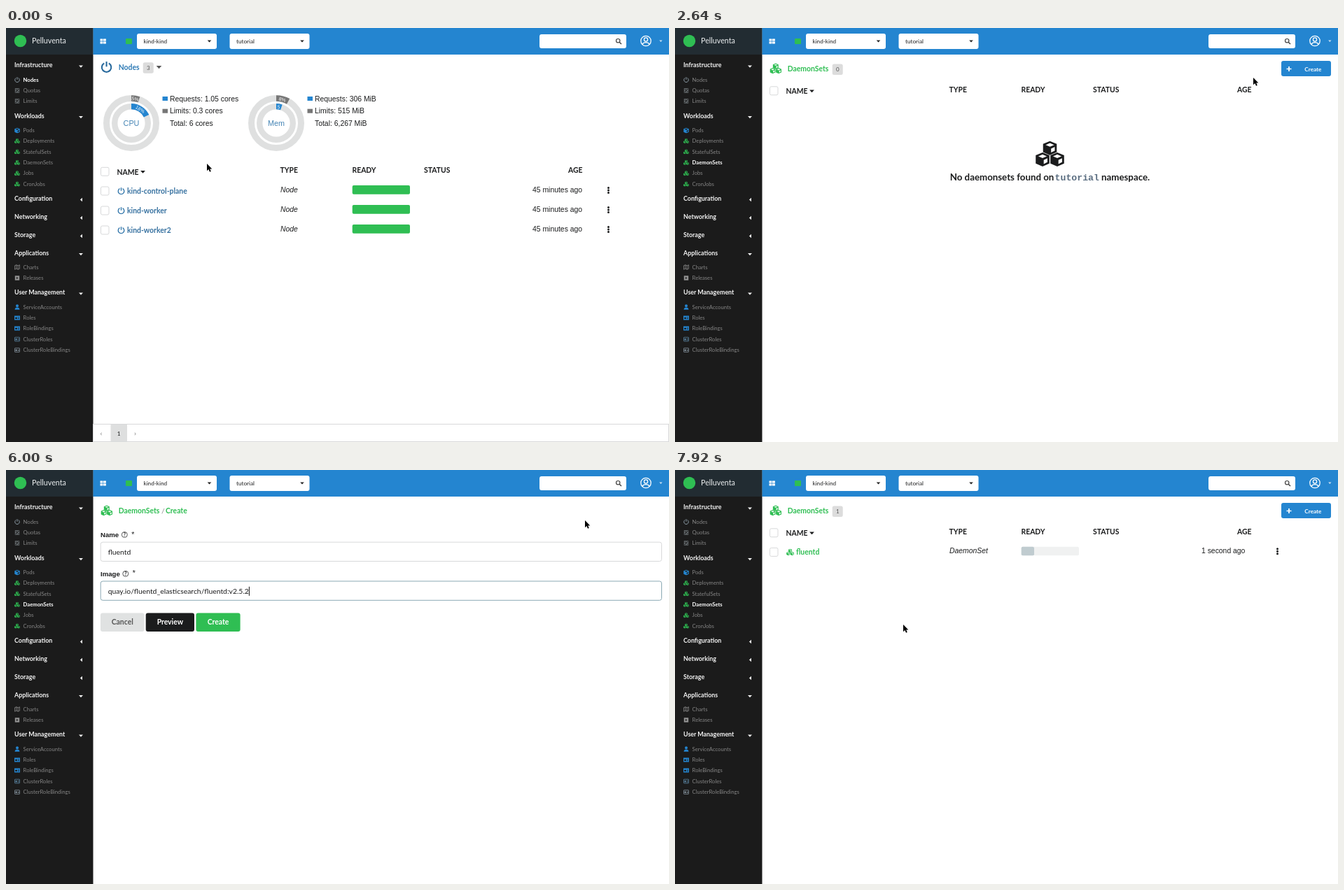
An HTML page for the animation above (8 s loop, 947 px wide and 592 px high).

```html
<!DOCTYPE html>
<html lang="en">
<head>
<meta charset="utf-8">
<title>Cluster console</title>
<style>
html, body { margin: 0; width: 100%; height: 100%; overflow: hidden; background: #fff; }
svg { display: block; }
#stage { width: 947px; height: 592px; }
text { font: 10.4px Lato, sans-serif; fill: #1b1c1d; white-space: pre; }
.bold { font-weight: 700; }
.plain { font-family: "Liberation Sans", Arial, sans-serif; }
.italic { font-style: italic; }
.mid { text-anchor: middle; }
.small { font-size: 8.2px; }
.label { font: 700 9.6px "Liberation Sans", Arial, sans-serif; }
.section { font-size: 8.9px; font-weight: 700; fill: #f4f4f4; }
.item { font-size: 7.65px; fill: #868686; }
.item.hover { fill: #f2f2f2; }
.item.active { fill: #fff; font-weight: 700; }
.big { font-size: 13.3px; font-weight: 700; }
.code { font: 700 13.2px "Liberation Mono", monospace; fill: #5a6d80; }
.link { fill: #35709f; font-weight: 700; }
.green { fill: #2fbe53; font-weight: 700; }
.white { fill: #fff; font-weight: 700; }
.hint { fill: #b4bfc1; }
.pct { font: 7px "Liberation Sans", Arial, sans-serif; fill: #fff; text-anchor: middle; }
</style>
</head>
<body>
<svg id="stage" viewBox="0 0 947 592" xmlns="http://www.w3.org/2000/svg"></svg>
<script>
const BLUE = '#2485d0', GREEN = '#2fbe53', GREY = '#767676', DARK = '#1b1c1d', LINE = '#d8d9da';
const LOOP = 8000, STEP = 120;
const OPEN_LIST = 1560, OPEN_FORM = 3480, TYPE = 4080, TO_IMAGE = 5280, PASTE = 5640, SUBMIT = 7320;

const text = (x, y, s, cls = '', more = '') => `<text x="${x}" y="${y}" class="${cls}" ${more}>${s}</text>`;
const rect = (x, y, w, h, fill, r = 0, more = '') =>
  `<rect x="${x}" y="${y}" width="${w}" height="${h}" rx="${r}" fill="${fill}" ${more}/>`;
const path = (d, fill, more = '') => `<path d="${d}" fill="${fill}" ${more}/>`;
const line = (d, color, w = 1) => path(d, 'none', `stroke="${color}" stroke-width="${w}"`);
const circle = (x, y, r, color, w) => `<circle cx="${x}" cy="${y}" r="${r}" fill="none" stroke="${color}" stroke-width="${w}"/>`;
const group = (id, body) => `<g id="${id}">${body}</g>`;
const icon = (name, x, y, w, h, color) =>
  `<use href="#${name}" x="${x}" y="${y}" width="${w}" height="${h}" color="${color}"/>`;
const symbol = (id, w, h, body) => `<symbol id="${id}" viewBox="0 0 ${w} ${h}">${body}</symbol>`;
const down = (x, y, r, color) => path(`M${x - r} ${y - r / 2}h${2 * r}l${-r} ${r * 1.1}z`, color);

const C = 'currentColor';
const cube = (x, y) => path(`M${x} ${y - 9.5}l9.3 4v11l-9.3 4.2-9.3-4.2v-11z` +
  `M${x} ${y - 6.7}l-5.8 2.5 5.8 2.5 5.8-2.5zM${x + 1.6} ${y + 6.2}l5-2.4v-5.3l-5 2.3z`, C, 'fill-rule="evenodd"');

const defs = `<defs>
  ${symbol('power', 16, 16, line('M4.8 2.8A6.5 6.5 0 1 0 11.2 2.8M8 .6V7.6', C, 2))}
  ${symbol('cubes', 40, 36, cube(20, 10) + cube(10, 25.5) + cube(30, 25.5))}
  ${symbol('cube', 20, 20, cube(10, 10))}
  ${symbol('user', 10, 10, `<circle cx="5" cy="2.7" r="2.5" fill="${C}"/>` + path('M.7 9.6c0-5.4 8.6-5.4 8.6 0z', C))}
  ${symbol('card', 10, 10, path('M0 1.2h10v7.6H0zM1.5 6.8h3.3V4H1.5zM6 3.6v1h2.8v-1zM6 5.8v1h2.8v-1z', C, 'fill-rule="evenodd"'))}
  ${symbol('badge', 10, 10, rect(.6, 1.6, 8.8, 7, 'none', .6, `stroke="${C}"`) + path('M2 6.8V3.6h2.6v3.2zM6 4h2.4v1H6zM6 6h2.4v1H6z', C))}
  ${symbol('map', 10, 10, line('M.5 2.3L3.5 1l3 1.3 3-1.3v6.7l-3 1.3-3-1.3-3 1.3zM3.5 1v6.7M6.5 2.3V9', C))}
  ${symbol('quota', 10, 10, path('M1 1h8v8H1z', C, 'opacity=".55"') + line('M2 8l6-6M2 3.5h3M6 7h2.4', '#1b1b1b', 1.3))}
  ${symbol('release', 10, 10, path('M1 1h8v8H1zM3.6 3v4l3.4-2z', C, 'fill-rule="evenodd"'))}
  <pattern id="hatch" width="2" height="2" patternUnits="userSpaceOnUse">
    ${rect(0, 0, 2, 2, '#ccd5d8') + rect(0, 0, 1, 1, '#b4c2c7') + rect(1, 1, 1, 1, '#b4c2c7')}
  </pattern>
</defs>`;

// Sidebar: [title, y, expanded, [item, y, icon, color]...]
const menu = [
  ['Infrastructure', 53, 1, ['Nodes', 74, 'power', '#8a9aa5'], ['Quotas', 89.5, 'quota', '#a5b0b5'], ['Limits', 104.5, 'quota', '#a5b0b5']],
  ['Workloads', 125.5, 1, ['Pods', 146.5, 'cube', BLUE], ...['Deployments', 'StatefulSets', 'DaemonSets', 'Jobs', 'CronJobs']
    .map((name, i) => [name, 161.5 + i * 15.4, 'cubes', GREEN])],
  ['Configuration', 243.5, 0], ['Networking', 269.5, 0], ['Storage', 295.5, 0],
  ['Applications', 321.5, 1, ['Charts', 342, 'map', '#909090'], ['Releases', 357.5, 'release', '#909090']],
  ['User Management', 378, 1, ['ServiceAccounts', 399, 'user', BLUE], ['Roles', 414.5, 'card', BLUE],
    ['RoleBindings', 429.5, 'card', BLUE], ['ClusterRoles', 445, 'badge', '#5c87a5'], ['ClusterRoleBindings', 460.5, 'badge', '#8795a0']],
];

const sidebar = rect(0, 0, 124.5, 592, '#1b1b1b') + rect(0, 0, 124.5, 38, '#222c32') +
  `<circle cx="20.5" cy="18.5" r="8.7" fill="${GREEN}"/>` + text(37, 22.3, 'Pelluventa', '', 'style="font-size:10.7px;fill:#eceff0"') +
  menu.map(([title, y, open, ...items]) => text(12, y + 3, title, 'section') +
    (open ? down(107, y + 2, 3, '#eee') : path(`M109 ${y - .8}v5.6l-3.2-2.8z`, '#eee')) +
    items.map(([name, iy, shape, color]) => icon(shape, 12, iy - 4, 8, 8, color) +
      text(24.6, iy + 2.7, name, 'item', `id="item${name}"`)).join('')).join('');

const select = (x, w, s) => rect(x, 8, w, 22, '#fff', 3) + text(x + 9.5, 22, s, 'small') + down(x + w - 10.5, 18.8, 2.8, '#222');
const header = rect(124.5, 0, 823, 38, BLUE) +
  [134.5, 139].map(x => rect(x, 15.5, 3.9, 3.1, '#fff') + rect(x, 19.4, 3.9, 3.1, '#fff')).join('') +
  rect(171, 15, 9, 8, GREEN, 1) + select(187, 114, 'kind-kind') + select(319.5, 114, 'tutorial') +
  rect(762, 9, 124, 20, '#fff', 3) + circle(874.2, 18.2, 2.7, '#444', 1.2) + line('M876.2 20.2l2.8 2.8', '#444', 1.5) +
  circle(914, 18.5, 7.2, '#fff', 1.3) + circle(914, 16.5, 2.6, '#fff', 1.3) + line('M909 23.4c1.5-3.6 8.5-3.6 10 0', '#fff', 1.3) +
  down(935.3, 18.6, 2.2, '#cfe3f3');

const count = (x, y, n) => rect(x, y, 15, 15.5, '#dcdcdc', 2.5) + text(x + 7.5, y + 10.8, n, 'mid', 'style="font-size:8px;fill:#555"');
const checkbox = y => rect(135.5, y - 6, 11.5, 12, '#fff', 2, `stroke="${LINE}"`);

const tableHead = y => checkbox(y) + text(158.5, y + 4.2, 'NAME', 'bold') + down(195.5, y + .3, 3.4, DARK) +
  [['TYPE', 391.5], ['READY', 494.5], ['STATUS', 597], ['AGE', 803]].map(([s, x]) => text(x, y + 2, s, 'bold')).join('');
const tableRow = (y, name, type, age, shape, cls, color, bar) => checkbox(y) + icon(shape, 159, y - 5.2, 11, 10.5, color) +
  text(173, y + 4, name, cls) + text(392, y + 1.7, type, 'plain italic') + bar +
  text(752, y + 2, age, 'plain') + [-4.6, -1.1, 2.4].map(d => `<circle cx="860.5" cy="${y + d}" r="1.5" fill="${DARK}"/>`).join('');

// Draws a share of a ring, clockwise from the top.
function arc(x, y, r, w, share, color) {
  const a = share * 2 * Math.PI;
  return line(`M${x} ${y - r}A${r} ${r} 0 0 1 ${x + r * Math.sin(a)} ${y - r * Math.cos(a)}`, color, w);
}
function ringLabel(x, y, r, share, s) {
  const a = share * Math.PI;
  const px = x + r * Math.sin(a), py = y - r * Math.cos(a);
  return text(px, py + 2.5, s, 'pct', `transform="rotate(${share * 180} ${px} ${py})"`);
}
const donut = (x, name, limit, request, limitText, requestText, legend) => circle(x, 136, 35.5, '#dfe0e0', 9) +
  circle(x, 136, 23.8, '#dfe0e0', 8.4) + arc(x, 136, 35.5, 8.6, limit, GREY) + arc(x, 136, 23.8, 8.2, request, BLUE) +
  ringLabel(x, 136, 35, limit, limitText) + ringLabel(x, 136, 23.5, request, requestText) +
  text(x, 139.8, name, 'plain mid', 'style="font-size:10.8px;fill:#4685b5"') +
  rect(x + 44.5, 98, 7.5, 6, BLUE) + rect(x + 44.5, 115.7, 7.5, 6, GREY) +
  legend.map((s, i) => text(x + 55, 104.5 + i * 17.7, s, 'plain')).join('');

const nodesPage = icon('power', 135.3, 47.5, 16.5, 16.5, '#28699c') + text(160.7, 60, 'Nodes', 'bold', 'style="fill:#2a78b4"') +
  count(195.7, 49.2, 3) + down(218.5, 56, 3.8, '#555') +
  donut(179, 'CPU', .05, .18, '5%', '18%', ['Requests: 1.05 cores', 'Limits: 0.3 cores', 'Total: 6 cores']) +
  donut(386, 'Mem', .08, .05, '8%', '5', ['Requests: 306 MiB', 'Limits: 515 MiB', 'Total: 6,267 MiB']) + tableHead(205.3) +
  ['kind-control-plane', 'kind-worker', 'kind-worker2'].map((name, i) => tableRow(233 + i * 28, name, 'Node', '45 minutes ago',
    'power', 'link', '#2b72a8', rect(494.7, 225 + i * 28, 82.3, 12.8, GREEN, 2))).join('') +
  rect(124.5, 566.5, 822, 25, '#fff', 0, `stroke="${LINE}"`) + rect(149.5, 567, 23.5, 24.5, '#dedfdf') +
  text(136, 582.5, '‹', 'mid', 'style="fill:#777"') + text(161, 582.5, '1', 'mid small') + text(184.5, 582.5, '›', 'mid', 'style="fill:#777"');

const title = icon('cubes', 135.3, 50.2, 17, 15.5, GREEN) + text(160.7, 62.2, 'DaemonSets', 'green');
const listHead = title + rect(866, 47, 71, 22, BLUE, 3, 'id="newButton"') + line('M873.5 58.5h7M877 55v7', '#fff', 1.7) +
  text(899.3, 61.7, 'Create', 'white small') + tableHead(89.8);
const emptyPage = listHead + count(224.7, 51.5, 0) + icon('cubes', 514.5, 161, 42, 38, DARK) +
  text(392.7, 218, 'No daemonsets found on', 'big') + text(542.6, 218, 'tutorial', 'code') + text(609, 218, 'namespace.', 'big');
const filledPage = listHead.replace(' id="newButton"', '').replace('id="newButton"', '') + count(224.7, 51.5, 1) +
  tableRow(117.4, 'fluentd', 'DaemonSet', '1 second ago', 'cubes', 'green', GREEN,
    rect(494.7, 109.7, 82.3, 12.5, '#f0f1f1', 2) + rect(494.7, 109.7, 18.3, 12.5, 'url(#hatch)', 2));

const field = (id, y, name, iconX) => text(135, y - 7, name, 'label') + circle(iconX, y - 10.5, 4, '#444', .9) +
  text(iconX, y - 8, '?', 'bold mid', 'style="font-size:7px"') + text(iconX + 12, y - 7.5, '*', 'mid plain') +
  rect(135.2, y + .2, 801.3, 27.3, '#fff', 3, `id="${id}Box"`) + text(145.7, y + 18.4, '', '', `id="${id}Text"`) +
  rect(0, y + 8, 1, 13, '#111', 0, `id="${id}Caret"`);
const button = (id, x, w, s, fill, cls, style = '') => rect(x, 204.5, w, 26.5, fill, 3, `id="${id}"`) +
  text(x + w / 2, 221.4, s, 'bold mid ' + cls, style);
const formPage = title + text(222, 62.2, '/', '', 'style="fill:#888"') + text(228, 62.2, 'Create', 'green') +
  field('name', 103, 'Name', 169.3) + field('image', 158.8, 'Image', 170.8) +
  button('cancel', 135, 62.5, 'Cancel', '#e0e2e2', '', 'style="fill:#555"') +
  button('preview', 199.7, 69.3, 'Preview', DARK, 'white') + button('create', 271.4, 63.2, 'Create', GREEN, 'white');

const cursor = group('cursor',
  group('arrow', path('M0 0V10.2L2.4 8 4 11.8 5.8 11 4.2 7.4H7.3Z', '#000', 'stroke="#fff" stroke-width=".8" paint-order="stroke"')) +
  group('hand', path('M-1 1.3a1 1 0 0 1 2 0V5l.3-.6 2 .3.3.6 1.7.4.5.6 1 .4.3 3-.9 3H.2L-2.8 8.6c-.7-1 .4-1.8 1.1-1.1L-1 8.2z',
    '#fff', 'stroke="#000" stroke-width=".9"') + line('M1.8 9v2.4M3.4 9v2.4M5 9v2.4', '#222', .6)));

const pages = { nodes: nodesPage, empty: emptyPage, form: formPage, filled: filledPage };
document.getElementById('stage').innerHTML = defs + rect(0, 0, 947, 592, '#fff') + sidebar + header +
  Object.entries(pages).map(([id, body]) => group(id, body)).join('') + cursor;

const el = id => document.getElementById(id);
const show = (id, on) => el(id).setAttribute('display', on ? 'inline' : 'none');
const attr = (id, name, value) => el(id).setAttribute(name, value);

const route = [[0, 287, 194], [360, 287, 194], [1200, 74, 194], [2040, 74, 194], [2640, 826, 71], [2760, 826, 71],
  [3240, 876, 58], [5880, 876, 58], [6000, 827, 72], [6720, 326, 221], [LOOP, 326, 221]];
function pointer(t) {
  const i = route.findIndex(p => p[0] > t);
  const [t0, x0, y0] = route[i - 1], [t1, x1, y1] = route[i];
  const u = (t - t0) / (t1 - t0), e = u * u * (3 - 2 * u);
  return [x0 + (x1 - x0) * e, y0 + (y1 - y0) * e];
}

function setField(id, value, focused, caret) {
  const node = el(id + 'Text');
  node.textContent = value || (id === 'name' ? 'Name' : 'Image');
  node.setAttribute('class', value ? '' : 'hint');
  attr(id + 'Box', 'stroke', focused ? '#8aa9b4' : LINE);
  show(id + 'Caret', caret);
  if (caret) attr(id + 'Caret', 'x', 145.7 + (value ? node.getComputedTextLength() : 0));
}

const keyTimes = [TYPE, 4320, 4440, 4560, 4680, 4800, 5040];
function render(now) {
  const t = Math.floor(now % LOOP / STEP) * STEP;
  const page = t < OPEN_LIST ? 'nodes' : t < OPEN_FORM ? 'empty' : t < SUBMIT ? 'form' : 'filled';
  for (const id in pages) show(id, id === page);

  const [x, y] = pointer(t);
  const onMenu = x < 100;
  const onNew = page === 'empty' && x > 866 && y < 69;
  const hand = onMenu || onNew || (page === 'form' && t >= 6720);
  attr('cursor', 'transform', `translate(${x} ${y})`);
  show('cursor', t < TYPE || t >= 6000);
  show('hand', hand);
  show('arrow', !hand);
  attr('newButton', 'fill', onNew ? '#1678c2' : BLUE);
  attr('itemNodes', 'class', page === 'nodes' ? 'item active' : 'item');
  attr('itemDaemonSets', 'class', page !== 'nodes' ? 'item active' : onMenu ? 'item hover' : 'item');

  if (page === 'form') {
    const onImage = t >= TO_IMAGE, ready = t >= PASTE;
    setField('name', 'fluentd'.slice(0, keyTimes.filter(k => k <= t).length), !onImage, !onImage);
    setField('image', ready ? 'quay.io/fluentd_elasticsearch/fluentd:v2.5.2' : '', onImage, onImage && t < 6960);
    attr('preview', 'fill', ready ? DARK : '#7d7577');
    attr('create', 'fill', ready ? GREEN : '#a5bec3');
  }
}

const start = performance.now();
function tick() {
  render(performance.now() - start);
  requestAnimationFrame(tick);
}
tick();
</script>
</body>
</html>
```
